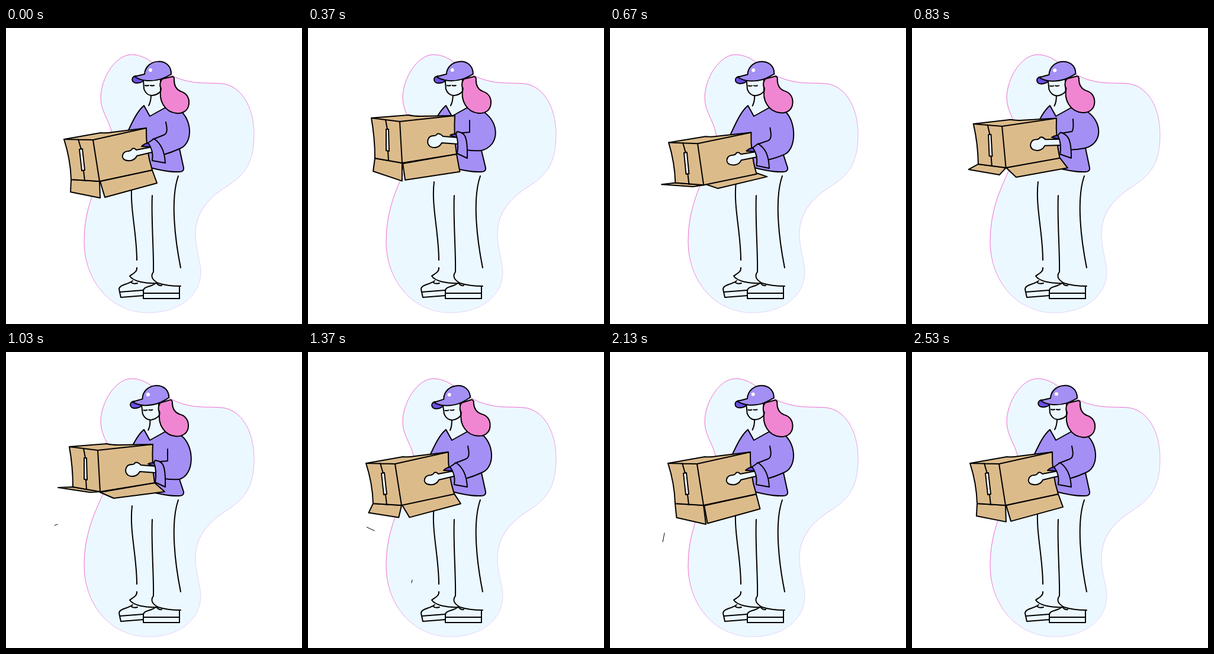
Recreate the animation shown at these times as an HTML page. Size 500 by 500 pixels, loop 2560 ms.

```html
<!DOCTYPE html>
<html lang="en">
<head>
<meta charset="utf-8">
<title>Carrying a box</title>
<style>
  html, body { margin: 0; height: 100%; overflow: hidden; background: #fff; }
  svg { display: block; width: 100%; height: 100%; }
  .line { fill: none; stroke: #000; stroke-width: 2; stroke-linecap: round; stroke-linejoin: round; }
  .shirt { fill: #a48ff5; }
  .shade { fill: #6a50e6; }
  .card { fill: #dcbb8b; }
  .skin { fill: #ecf8ff; }
  .hair { fill: #f086d2; }
  .white { fill: #fff; }
</style>
</head>
<body>
<svg viewBox="0 0 500 500">
  <defs>
    <linearGradient id="rim" gradientUnits="userSpaceOnUse" x1="130" y1="150" x2="400" y2="400">
      <stop offset=".42" stop-color="#f06ccf"/>
      <stop offset=".75" stop-color="#e2d4f8"/>
    </linearGradient>
  </defs>
  <path fill="#ecf8ff" stroke="url(#rim)" d="M212 45C185 45 160 85 160 118C160 145 180 160 180 190C180 228 132 275 132 360C132 430 180 481 240 481C295 481 329 450 329 412C329 395 320 375 320 347C320 310 345 285 372 268C400 250 419 232 419 180C419 130 395 97 365 94C340 92 325 95 300 88C262 78 245 45 212 45Z"/>

  <g class="line">
    <path d="M213 260C208 300 221 345 221 392M247 283C245 320 250 380 249 412M291 250C277 290 286 360 295 405"/>
    <path d="M221 405C222 412 214 415 209 419C215 428 235 432 255 431M249 412C243 420 248 426 257 431Q272 436 295 436"/>
    <path d="M214 427C205 434 192 433 191 441L192 446L231 443M192 446L194 455L232 452M212 430Q215 433 222 431"/>
    <path d="M253 431C245 438 232 436 232 444V457H293V436M232 448H293M254 430Q257 436 263 435"/>
  </g>

  <path id="torso" class="line shirt"/>

  <g id="head" class="line">
    <path d="M245 113Q245 124 241 131"/>
    <path class="skin" d="M232 88L233 103Q237 114 247 114Q256 113 261 107V86Z"/>
    <path d="M235 97Q238 98 241 97M244 97Q247 98 250 97"/>
    <path class="hair" d="M264 86L281 82Q285 83 284 88C284 97 288 104 295 107C305 110 310 118 309 128C308 140 298 145 288 144C268 142 257 122 262 102C259 98 260 90 264 86Z"/>
    <path class="shade" d="M219 81C211 82 211 93 221 93Q229 93 233 88Z"/>
    <path class="shirt" d="M217 82L234 78C236 50 280 49 279 78C268 84 258 90 238 89Q226 88 217 82Z"/>
    <circle class="white" stroke="none" cx="244" cy="71" r="3"/>
  </g>

  <g id="load"></g>
  <g id="dashes"></g>
</svg>
<script>
const LOOP = 2560;
const el = id => document.getElementById(id);

function addPath(parent, cls) {
  const path = document.createElementNS('http://www.w3.org/2000/svg', 'path');
  path.setAttribute('class', cls);
  return parent.appendChild(path);
}

// Blends the numbers of two paths that share the same commands.
function mix(a, b, k) {
  const target = b.match(/-?\d+(\.\d+)?/g);
  let i = 0;
  return a.replace(/-?\d+(\.\d+)?/g, n => (+n + (target[i++] - n) * k).toFixed(2));
}

// Eased value of a keyframe track of [time, value] pairs.
function track(keys, t) {
  const i = keys.findIndex(key => key[0] > t);
  if (i < 1) return keys[i ? keys.length - 1 : 0][1];
  const [t0, v0] = keys[i - 1], [t1, v1] = keys[i];
  const x = (t - t0) / (t1 - t0);
  return v0 + (v1 - v0) * x * x * (3 - 2 * x);
}

const LIFT = [[0, 0], [350, 1], [390, 1], [680, .12], [950, 1], [1060, 1], [1350, 0]];
const DROP = [[0, 0], [400, 0], [670, 10], [860, -4], [1030, 8], [1340, 0]];
const FLAP = [[0, 0], [200, -.15], [370, -.05], [670, 1], [750, 1.1], [880, .4], [1030, 1], [1080, 1.05],
  [1370, .3], [1560, -.25], [1840, .2], [2110, -.16], [2400, .06], [2560, 0]];
const TILT = [[0, 0], [200, 0], [1450, -4.2], [1600, -4.2], [2560, 0]];

// Each part: class, lowered shape, raised shape.
const parts = [
  ['card', 'M98 188L160 177Q170 178 180 176L237 169Q236 205 247 240L158 259L110 256Q109 222 98 188Z',
           'M107 152L170 147Q178 149 190 149L248 148Q246 180 251 213L159 228L113 220Q113 186 107 152Z'],
  ['', 'M98 188L147 189L237 169M147 189L158 259M122 188L127 205M131 241L133 258',
       'M107 152L155 158L248 148M155 158L159 228M131 155L134 171M135 208L136 224'],
  ['white', 'M124 205L129 204L133 240L128 241Z', 'M132 171L136 171L137 208L132 207Z'],
  ['', 'M270 159C271 165 275 178 266 181L248 188M266 214Q280 210 293 204',
       'M273 156C273 162 273 170 273 176L249 178M268 206Q280 208 293 207'],
  ['shade', 'M229 200Q236 193 244 195L250 212L246 201Z', 'M240 181Q245 178 252 180L254 200L253 186Z'],
  ['skin', 'M246 201L220 206Q217 202 213 204Q212 207 207 208C197 208 193 219 201 223C210 226 218 223 221 216L246 210',
           'M253 185L228 183Q222 177 218 179Q217 182 212 182C202 182 199 194 206 200C213 204 222 202 226 194L253 196'],
  ['shirt', 'M240 194Q246 190 250 187C262 195 268 208 269 228L247 224C249 212 246 202 240 194Z',
            'M250 179Q251 176 252 175C264 177 270 180 269 220L252 212C254 200 254 190 250 179Z'],
  ['', 'M255 218a3 3 0 1 0 6 0a3 3 0 1 0 -6 0', 'M258 208a3 3 0 1 0 6 0a3 3 0 1 0 -6 0']
];

// Each flap: hanging lowered, hanging raised, swung lowered, swung raised.
const flaps = [
  ['M110 256L158 259l1 28l-50 -10Z', 'M113 220L159 228l-1 29l-49 -16Z',
   'M110 256L158 259l-18 3l-53 -3Z', 'M113 220L159 228l-17 1l-54 -8Z'],
  ['M159 259l8 27l88 -24L247 240Z', 'M160 229l5 27l92 -14L251 213Z',
   'M158 256l24 8l83 -21L247 238Z', 'M159 229l23 10l86 -11L251 213Z']
];

// Specks in the air: time, centre, direction.
const specks = [[1030, 84.5, 292, 5, -2], [1370, 106, 299, -13, -6], [1370, 175.5, 387.5, 1, -5], [2130, 90.5, 313.5, 3, -15]];

const load = el('load');
const flapPaths = flaps.map(() => addPath(load, 'line card'));
const partPaths = parts.map(([cls]) => addPath(load, 'line ' + cls));
const speckPath = addPath(el('dashes'), 'line');
speckPath.style.strokeWidth = 1;

function draw(t) {
  const lift = track(LIFT, t), drop = track(DROP, t), swing = track(FLAP, t);
  const elbow = 315 + (9 - .66 * drop) * lift;
  const armpit = 204 + 3 * lift + drop;

  el('torso').setAttribute('d', `M233 131C220 142 212 162 202 183L230 232Q270 244 292 243Q301 243 300 236L293 ${armpit}` +
    `C${elbow} ${armpit - 8} ${elbow} 160 297 142L270 134L243 149Z`);
  el('head').setAttribute('transform', `rotate(${track(TILT, t)} 258 145)`);
  load.setAttribute('transform', `translate(0 ${drop})`);
  parts.forEach(([, low, high], i) => partPaths[i].setAttribute('d', mix(low, high, lift)));
  flaps.forEach(([hangLow, hangHigh, swungLow, swungHigh], i) =>
    flapPaths[i].setAttribute('d', mix(mix(hangLow, hangHigh, lift), mix(swungLow, swungHigh, lift), swing)));

  speckPath.setAttribute('d', specks.filter(s => Math.abs(t - s[0]) < 100).map(([at, x, y, dx, dy]) => {
    const k = (t - at) / 60 - .5;
    return `M${x + dx * k} ${y + dy * k}l${dx} ${dy}`;
  }).join(''));
}

function tick() {
  draw(performance.now() % LOOP);
  requestAnimationFrame(tick);
}
tick();
</script>
</body>
</html>
```
